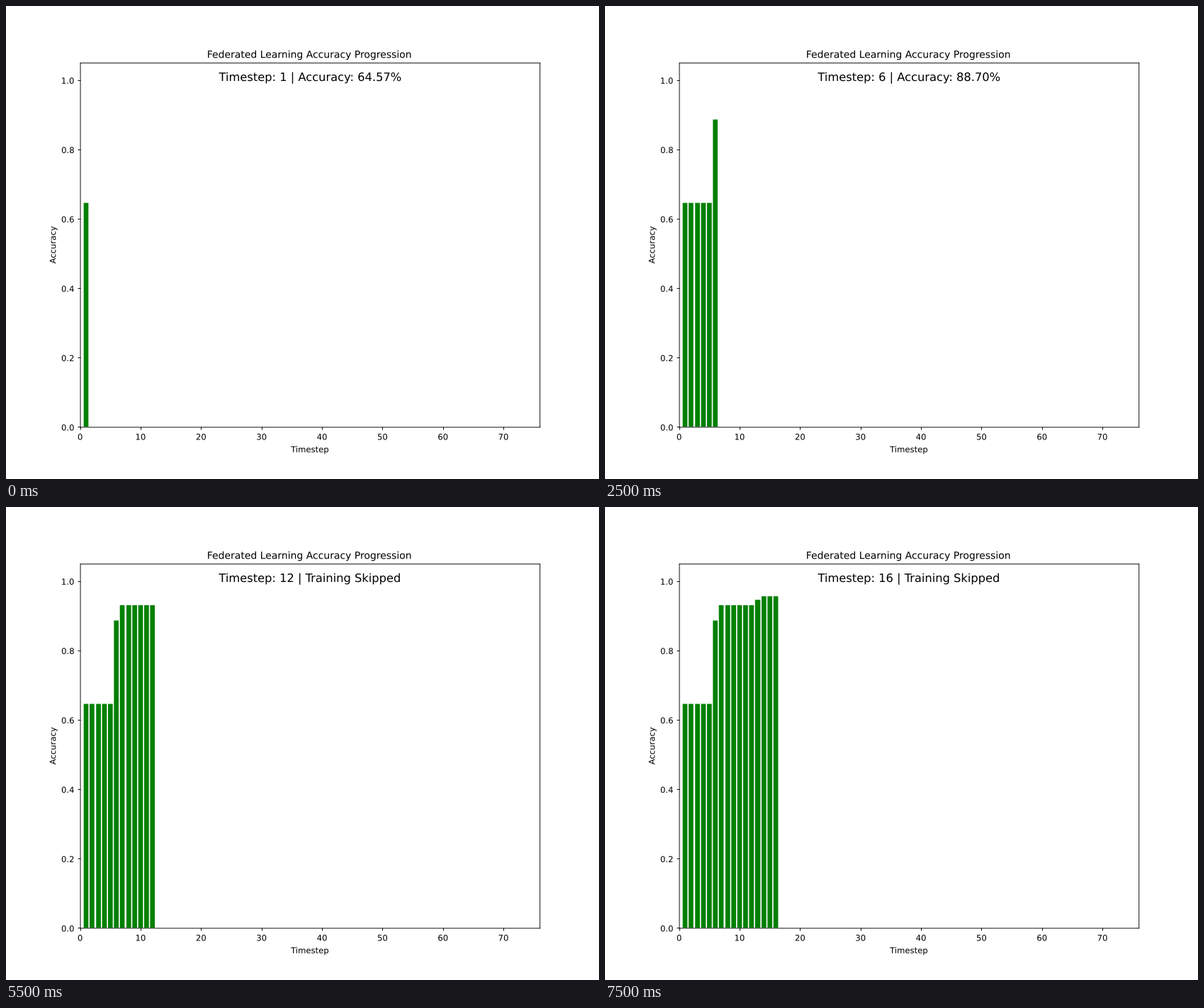
Recreate the animation shown at these times as a matplotlib script. Size 837 by 669 pixels, loop 8 s.

```python
import matplotlib.pyplot as plt
import numpy as np
from matplotlib.animation import FuncAnimation
from matplotlib.patheffects import Normal
from matplotlib.text import Text
from matplotlib.transforms import Affine2D, ScaledTranslation

W, H, DPI = 837, 669, 83.7
LAYOUT = 1000, 800  # bars align to the pixels of this larger layout
STEPS, STEP_MS = 16, 500
MAX_STEP, BAR_WIDTH = 76, 0.8

# Accuracy reached at each step that trained; other steps keep the last value.
TRAINED = {1: 0.6457, 6: 0.8870, 7: 0.9304, 13: 0.9457, 14: 0.9565}


def accuracy(step):
    return TRAINED[max(s for s in TRAINED if s <= step)]


def status(step):
    if step in TRAINED:
        return f"Timestep: {step} | Accuracy: {TRAINED[step]:.2%}"
    return f"Timestep: {step} | Training Skipped"


plt.rcParams.update({"font.family": "DejaVu Sans", "path.snap": False})
# The tiny margin keeps the pixel size from truncating one short.
fig, ax = plt.subplots(figsize=((W + 1e-3) / DPI, (H + 1e-3) / DPI), dpi=DPI)
ax.set_xlim(0, MAX_STEP)
ax.set_ylim(0, 1.05)
ax.set_title("Federated Learning Accuracy Progression")
ax.set_xlabel("Timestep")
ax.set_ylabel("Accuracy")

# Frame lines run through the middle of a layout pixel.
half_pixel = ScaledTranslation(0.005, -0.005, fig.dpi_scale_trans)
for spine in ax.spines.values():
    spine.set_transform(spine.get_spine_transform() + half_pixel)

grid = ax.transData + fig.transFigure.inverted() + Affine2D().scale(*LAYOUT)


def align(points):
    return grid.inverted().transform(np.floor(grid.transform(points) + 0.5))


steps = np.arange(1, STEPS + 1)
heights = [accuracy(s) for s in steps]
left, top = align(np.column_stack([steps - BAR_WIDTH / 2, heights])).T
right, _ = align(np.column_stack([steps + BAR_WIDTH / 2, heights])).T
bars = ax.bar(left, top, width=right - left, align="edge", color="green")
label = ax.text(0.5, 0.95, "", transform=ax.transAxes, ha="center", fontsize=14)

# Draw text as outlines, so it is placed at fractions of a pixel.
for text in fig.findobj(Text):
    text.set_path_effects([Normal()])


def update(frame):
    for i, bar in enumerate(bars):
        bar.set_visible(i <= frame)
    label.set_text(status(frame + 1))
    return [*bars, label]


anim = FuncAnimation(fig, update, frames=STEPS, init_func=lambda: update(0),
                     interval=STEP_MS, repeat=True, repeat_delay=0)
plt.show()
```
